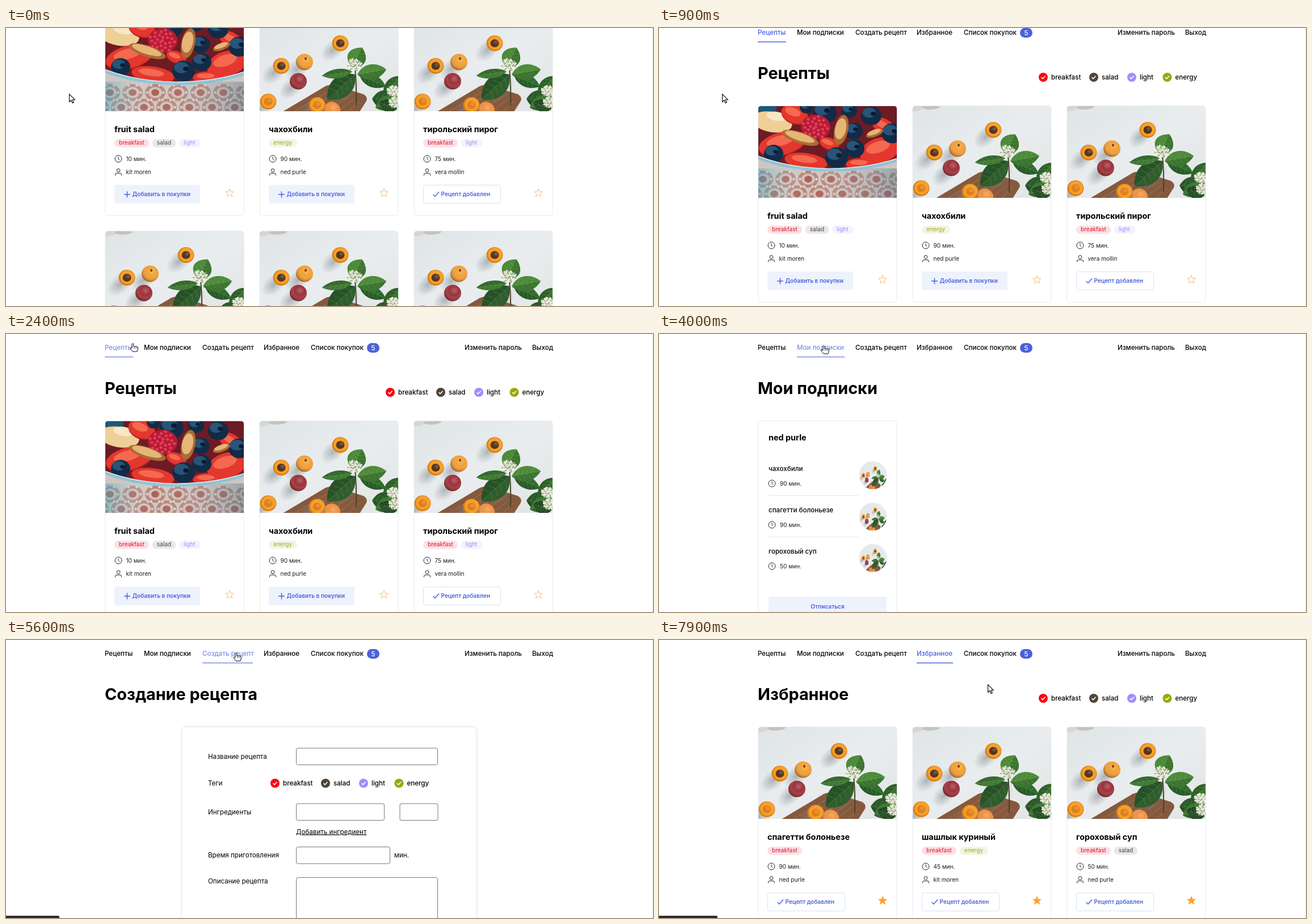
Write an HTML page that moves like this. It is 1140x491 px and loops after 8 s.

```html
<!DOCTYPE html>
<html lang="ru">
<head>
<meta charset="utf-8">
<title>Рецепты</title>
<style>
html, body { margin: 0; width: 100%; height: 100%; overflow: hidden; background: #fff; }
svg { display: block; }
text { font: 500 11.6px Inter, "Open Sans", sans-serif; fill: #000; white-space: pre; }
text.title { font-size: 28.8px; font-weight: 700; }
text.name { font-size: 14.4px; font-weight: 700; }
text.small { font-size: 10.1px; font-weight: 400; fill: #1c1c1c; }
text.button { font-size: 10.1px; font-weight: 600; fill: #4a61dd; }
text.label { font-weight: 400; }
.icon { fill: none; stroke: #222; }
.blue { fill: none; stroke: #4a61dd; stroke-width: 1.5; }
.frame { fill: #fff; stroke: #e8eaee; }
.input { fill: #fff; stroke: #777; }
</style>
</head>
<body>
<svg id="stage" width="1140" height="491" viewBox="0 0 1140 491"></svg>
<script>
const LOOP = 8000;
const stage = document.getElementById('stage');

// ---- drawing helpers ----
const text = (x, y, str, cls = '', extra = '') => `<text x="${x}" y="${y}" class="${cls}" ${extra}>${str}</text>`;
const rect = (x, y, w, h, r, attrs) => `<rect x="${x}" y="${y}" width="${w}" height="${h}" rx="${r}" ${attrs}/>`;
const path = (d, attrs) => `<path d="${d}" ${attrs}/>`;
const blob = (x, y, rx, ry, color, turn = 0) =>
  `<ellipse cx="${x}" cy="${y}" rx="${rx}" ry="${ry}" fill="${color}" transform="rotate(${turn} ${x} ${y})"/>`;
const at = (x, y, body, attrs = '') => `<g transform="translate(${x} ${y})" ${attrs}>${body}</g>`;
const times = (n, fn) => Array.from({ length: n }, (_, i) => fn(i)).join('');

// ---- photos, 244 x 162 ----
const leaf = (x, y, len, bulge, angle, color) =>
  `<g transform="translate(${x} ${y}) rotate(${angle})">` +
  path(`M0 0C${len * .25} ${-bulge} ${len * .7} ${-bulge} ${len} 0C${len * .7} ${bulge} ${len * .25} ${bulge} 0 0`, `fill="${color}"`) +
  path(`M0 0C${len * .25} ${bulge} ${len * .7} ${bulge} ${len} 0Z`, 'fill="#12301a" opacity=".25"') +
  path(`M0 0H${len}` + times(4, i => `M${len * (i + 1) / 6} 0l6 ${-bulge / 2}m-6 ${bulge / 2}l6 ${bulge / 2}`),
    'fill="none" stroke="#a4c878" stroke-opacity=".3" stroke-width=".8"') + '</g>';

const blossom = (x, y, size) => times(50, i => {
  const d = size * Math.sqrt(i / 50), a = i * 2.4;
  return blob(x + d * Math.cos(a), y + d * .75 * Math.sin(a), 1.9, 1.6, i % 3 ? '#eeeee2' : '#a9b491');
});

const castShadow = (x, y) => blob(x - 13, y + 12, 25, 16, 'url(#cast)', -42);
const half = (x, y, pit) => castShadow(x, y) + blob(x, y, 14.5, 14, '#d98316') +
  blob(x + 1, y - 1, 12.5, 12, '#f6a02b') + blob(x, y, 7.5, 7, pit) + blob(x + 2, y - 2, 3.5, 3, '#fff', 0).replace('/>', ' opacity=".15"/>');
const whole = (x, y, color) => castShadow(x, y) + blob(x, y, 15, 14.5, color) + blob(x, y, 15, 14.5, 'url(#sphere)');

const apricots = rect(0, 0, 244, 162, 0, 'fill="url(#table)"') +
  blob(30, 0, 18, 6, '#c5c2b8') + blob(2, 2, 16, 7, '#d5d6d2') +
  path('M40 163L112 120Q120 114 132 116L183 132Q191 137 188 144L176 163Z', 'fill="#85593e"') +
  times(6, i => path(`M${62 + i * 19} 162l${64 - i * 9} ${-38 + i * 4}`, 'stroke="#a97a58" stroke-width="1.5" opacity=".5"')) +
  half(142, 42, '#583620') + half(38, 82, '#583620') + half(15, 145, '#e0801c') + half(101, 151, '#e0801c') +
  whole(79, 75, '#f2a035') + blob(81, 69, 2, 2.5, '#6b4420') +
  whole(68, 109, '#9c3039') + whole(127, 160, '#ee9040') +
  blob(148, 122, 34, 22, 'url(#cast)', -40) +
  leaf(168, 97, 66, 25, 138, '#2f5d2d') + leaf(163, 92, 54, 11, 172, '#407a35') +
  leaf(162, 84, 39, 22, -62, '#4b8a38') + leaf(176, 98, 50, 15, 24, '#2f6b2f') +
  leaf(172, 97, 52, 18, -10, '#4c8b3a') +
  leaf(246, 100, 46, 16, 126, '#37702f') + leaf(198, 140, 46, 22, 4, '#2b5a2a') +
  leaf(204, 156, 46, 17, -24, '#3c7834') + leaf(242, 158, 34, 15, 200, '#244d25') +
  path('M168 86Q171 120 170 152', 'fill="none" stroke="#4b4328" stroke-width="2"') +
  blossom(166, 80, 14) + blossom(236, 126, 12) + blossom(240, 146, 13);

const berry = (x, y, r) => blob(x, y, r, r * .92, '#122b46') + blob(x - r * .2, y - r * .3, r * .65, r * .5, '#285478') +
  blob(x + r * .2, y - r * .2, r * .25, r * .2, '#0b1c30');
const slice = (x, y, rx, ry, turn) => blob(x, y + 2, rx, ry, '#a81f22', turn) + blob(x, y, rx, ry, '#e4372d', turn) +
  blob(x - 3, y - ry * .25, rx * .6, ry * .45, '#f4694f', turn);
const walnut = (x, y, rx, ry, turn) => blob(x, y, rx, ry, '#a86c35', turn) + blob(x - 1, y - 2, rx * .8, ry * .7, '#e6b577', turn);

const RIM = 'M0 91Q55 112 125 113Q195 112 244 95';
const tile = (x, y) => `<g transform="translate(${x} ${y})">` + blob(0, 0, 18, 15, '#b9837b') +
  blob(0, 0, 12, 10, '#d3c1b8') + blob(0, 0, 7, 6, '#ac625a') +
  times(6, i => blob(14.5, 0, 2.2, 2.2, '#d9d2cb', 0).replace('rotate(0 14.5 0)', `rotate(${i * 60})`)) + '</g>';

const fruitBowl = rect(0, 0, 244, 162, 0, 'fill="#6d1b24"') +
  blob(4, 4, 28, 18, '#1d5977') + blob(24, 28, 36, 18, '#efcf98', 10) + blob(32, 18, 18, 8, '#f8e7c4', 10) +
  slice(64, 14, 24, 16, 20) + slice(42, 66, 42, 20, -14) + slice(84, 97, 38, 14, 8) +
  slice(214, 78, 36, 22, -18) + slice(180, 102, 26, 10, 0) + slice(222, 36, 24, 13, 30) + slice(125, 66, 18, 10, 20) +
  berry(117, 12, 21) + berry(160, 8, 14) + berry(199, 17, 18) + berry(236, 48, 19) + berry(168, 44, 16) + berry(85, 2, 12) +
  blob(101, 37, 26, 22, '#b81a36') +
  times(26, i => blob(101 + 4.6 * Math.sqrt(i) * Math.cos(i * 2.4), 37 + 4 * Math.sqrt(i) * Math.sin(i * 2.4), 2.6, 2.4, '#e23f58')) +
  walnut(74, 56, 34, 10, 18) + walnut(146, 42, 12, 27, 12) + walnut(205, 48, 16, 6, -20) +
  berry(170, 75, 17) + berry(27, 84, 17) + berry(138, 91, 20) +
  path(RIM + 'V162H0Z', 'fill="#cfc6bf"') +
  `<g clip-path="url(#bowlClip)">` +
  times(14, i => tile(8 + (i % 7) * 40 - (i > 6 ? 20 : 0), i > 6 ? 155 : 129)) + '</g>' +
  path(RIM, 'fill="none" stroke="#8fc3d8" stroke-width="6"') +
  at(0, -2.5, path(RIM, 'fill="none" stroke="#dcebf0" stroke-width="1.5"')) +
  rect(0, 110, 244, 52, 0, 'fill="url(#shade)"');

const stops = list => list.map(([offset, color, alpha]) => `<stop offset="${offset}" stop-color="${color}" stop-opacity="${alpha}"/>`).join('');
const defs = `<defs>
  <linearGradient id="table" x2="1" y2="1">${stops([[0, '#dfe4e7', 1], [.5, '#e9edef', 1], [1, '#e2e4e3', 1]])}</linearGradient>
  <linearGradient id="shade">${stops([[0, '#3aa5bd', .45], [.35, '#fff', 0], [1, '#3f6f86', .4]])}</linearGradient>
  <radialGradient id="cast">${stops([[0, '#6f787e', .5], [.5, '#7f888e', .28], [1, '#7f888e', 0]])}</radialGradient>
  <radialGradient id="sphere" cx=".6" cy=".35" r=".65">${stops([[0, '#fff', .25], [.45, '#fff', 0], [1, '#401000', .4]])}</radialGradient>
  <clipPath id="bowlClip"><path d="${RIM}V162H0Z"/></clipPath>
  <clipPath id="photoClip"><path d="M0 162V5Q0 0 5 0H239Q244 0 244 5V162Z"/></clipPath>
  <clipPath id="thumbClip"><circle cx="24.5" cy="24.5" r="24.5"/></clipPath>
  <symbol id="apricots" viewBox="0 0 244 162" preserveAspectRatio="none">${apricots}</symbol>
  <symbol id="bowl" viewBox="0 0 244 162" preserveAspectRatio="none">${fruitBowl}</symbol>
</defs>`;

// ---- interface parts ----
const clock = (x, y) => `<circle cx="${x}" cy="${y}" r="6" class="icon"/>` + path(`M${x} ${y - 3.5}V${y}l2 2.2`, 'class="icon"');
const person = (x, y) => `<circle cx="${x}" cy="${y - 3}" r="2.9" class="icon"/>` +
  path(`M${x - 5.5} ${y + 6}v-1.5q0-2.5 2.5-2.5h6q2.5 0 2.5 2.5v1.5`, 'class="icon"');
const star = (x, y, filled) => path('M' + Array.from({ length: 10 }, (_, i) => {
  const r = i % 2 ? 3.3 : 7.6, a = i * Math.PI / 5;
  return `${(x + r * Math.sin(a)).toFixed(1)} ${(y - r * Math.cos(a)).toFixed(1)}`;
}).join('L') + 'Z', `fill="${filled ? '#ffa32b' : 'none'}" stroke="${filled ? '#ffa32b' : '#f9bd6c'}" stroke-linejoin="round"`);

const TAGS = {
  breakfast: { width: 61, ink: '#e00f2b', tint: '#fce0e4', dot: '#fb0312', shift: 0 },
  salad: { width: 41.5, ink: '#4b433c', tint: '#e9e8e8', dot: '#504539', shift: 89 },
  light: { width: 38, ink: '#9c8cf8', tint: '#f3f3fe', dot: '#a08dff', shift: 156 },
  energy: { width: 50, ink: '#a0aa17', tint: '#f3f4e4', dot: '#9ba80c', shift: 218.5 },
};

const legend = (x, y) => Object.entries(TAGS).map(([name, tag]) => at(x + tag.shift, y,
  `<circle r="8" fill="${tag.dot}"/>` + path('M-3.5 0L-1 2.5L3.5 -2.3', 'fill="none" stroke="#fff" stroke-width="1.6"') +
  text(14, 4, name))).join('');

function tagRow(names) {
  let x = 16;
  return names.map(name => {
    const { width, ink, tint } = TAGS[name];
    const pill = rect(x, 211, width, 14.5, 7.2, `fill="${tint}"`) + text(x + 8, 221.3, name, 'small', `style="fill:${ink}"`);
    x += width + 5.8;
    return pill;
  }).join('');
}

const photoCard = (photo, body = '') => rect(0, -.5, 244, 347, 5, 'class="frame"') +
  `<use href="#${photo}" width="244" height="162" clip-path="url(#photoClip)"/>` + body;

function recipeCard({ name, tags, minutes, author, photo = 'apricots', added, starred }) {
  const button = added
    ? rect(16.5, 292.5, 136, 32, 3, 'fill="#fff" stroke="#d8e1f6"') + path('M33.5 309l3.5 3.5l7-8', 'class="blue"')
    : rect(16, 292, 151, 33, 3, 'fill="#eef2fd"') + path('M33 309h11M38.5 303.5v11', 'class="blue"');
  return photoCard(photo, text(16, 199.4, name, 'name') + tagRow(tags) +
    clock(23, 246) + text(36.5, 249.5, `${minutes} мин.`, 'small') +
    person(23, 269.5) + text(36.5, 273, author, 'small') +
    button + text(47.5, 312, added ? 'Рецепт добавлен' : 'Добавить в покупки', 'button') +
    star(219, 306.5, starred));
}

const row = (cards, y = 154) => cards.map((card, i) => at(175 + 272 * i, y, card)).join('');
const heading = str => text(174, 106, str, 'title');

// ---- pages ----
const KIT = 'kit moren', NED = 'ned purle', VERA = 'vera mollin';

const recipes = heading('Рецепты') + legend(677, 103) + row([
  { name: 'fruit salad', tags: ['breakfast', 'salad', 'light'], minutes: 10, author: KIT, photo: 'bowl' },
  { name: 'чахохбили', tags: ['energy'], minutes: 90, author: NED },
  { name: 'тирольский пирог', tags: ['breakfast', 'light'], minutes: 75, author: VERA, added: true },
].map(recipeCard)) + row(Array(3).fill(photoCard('apricots')), 528);

const subscriptions = heading('Мои подписки') + rect(175, 153.5, 244, 361, 5, 'class="frame"') + text(193, 188, NED, 'name') +
  [['чахохбили', 90], ['спагетти болоньезе', 90], ['гороховый суп', 50]].map(([name, minutes], i) => at(193, 225 + 73 * i,
    text(0, 17, name) + clock(6, 39) + text(20, 42.5, `${minutes} мин.`, 'small') +
    at(159.5, 0, '<use href="#apricots" width="49" height="49"/>', 'clip-path="url(#thumbClip)"') +
    (i < 2 ? path('M0 60.5H159', 'stroke="#e6e8ec"') : ''))).join('') +
  rect(193, 464, 208, 32, 3, 'fill="#eef2fd"') + text(297, 484.5, 'Отписаться', 'button', 'text-anchor="middle"');

const labels = [['Название рецепта', 210], ['Теги', 257], ['Ингредиенты', 307.5], ['Время приготовления', 384], ['Описание рецепта', 430]];
const inputs = [[511.5, 191, 249], [511.5, 289, 155], [694, 289, 67], [511.5, 365.5, 165]];
const createForm = heading('Создание рецепта') +
  rect(309, 153, 521, 400, 9, 'fill="none" stroke="#f4f5f7" stroke-width="3"') + rect(309.5, 153.5, 520, 400, 8, 'class="frame"') +
  labels.map(([str, y]) => text(356, y, str, 'label')).join('') +
  inputs.map(([x, y, w]) => rect(x, y, w, 29.5, 3, 'class="input"')).join('') +
  rect(511.5, 419.5, 249, 120, 3, 'class="input"') + legend(474, 253) +
  text(511, 342.5, 'Добавить ингредиент', 'label', 'text-decoration="underline"') + text(684, 384, 'мин.', 'label');

const favouritesHead = heading('Избранное') + legend(677, 103);
const favourites = favouritesHead + row([
  { name: 'спагетти болоньезе', tags: ['breakfast'], minutes: 90, author: NED },
  { name: 'шашлык куриный', tags: ['breakfast', 'energy'], minutes: 45, author: KIT },
  { name: 'гороховый суп', tags: ['breakfast', 'salad'], minutes: 50, author: NED },
].map(card => recipeCard({ ...card, added: true, starred: true })));

const LINKS = [['Рецепты', 174, 224], ['Мои подписки', 243, 327], ['Создать рецепт', 346, 435], ['Избранное', 454, 518],
  ['Список покупок', 537, 629], ['Изменить пароль', 808, 909], ['Выход', 927, 964]];
const nav = LINKS.map(([str, x, end]) => `<g class="link">${text(x, 28.3, str)}${path(`M${x} 40.5H${end}`, 'stroke="#4a61dd" stroke-width="1.3"')}</g>`).join('') +
  rect(636, 16, 22, 17, 8.5, 'fill="#4a61dd"') + text(647, 28.5, '5', '', 'text-anchor="middle" style="fill:#fff"');

// start time, markup, active link
const PAGES = [[0, recipes, 0], [4000, subscriptions, 1], [5600, createForm, 2], [7000, favouritesHead, 3], [7200, favourites, 3]];

stage.innerHTML = defs + `<g id="content">${PAGES.map(p => `<g class="page">${p[1]}</g>`).join('')}${nav}</g>` +
  path('M1139.5 0V491', 'id="edge" stroke="#e9e9e9"') +
  path('', 'id="status" fill="#2d2d2f"') +
  path('M.6 .8V14.5L3.8 11.5L6 16.5L8.3 15.5L6.1 10.7H10.3Z', 'id="arrow" fill="#fff" stroke="#000" stroke-width="1.1"') +
  `<g id="hand">${path('M4 9V2.2a1.4 1.4 0 0 1 2.8 0V6H12q2.3 0 2.3 2.2V11L12.8 15H5.2L1 9.8Q.8 7.5 2.8 8Z', 'fill="#fff" stroke="#000" stroke-linejoin="round"')}${path('M7.5 7.5v2M9.7 7.5v2M12 7.5v2', 'stroke="#000" stroke-width=".8"')}</g>`;

// ---- motion ----
const SCROLL = [[0, 169], [100, 141], [200, 133], [300, 133], [400, 90], [500, 80], [700, 80], [800, 44], [900, 16],
  [1000, 5], [1100, 1], [1200, 1], [1300, 0], [4100, 0], [4200, 107], [4500, 107], [4600, 54], [4700, 0]];
const POINTER = [[0, 111, 116], [2000, 111, 116], [2400, 218, 16], [3900, 218, 16], [4000, 285, 20], [4100, 285, 20],
  [4200, 393, 178], [5000, 393, 178], [5400, 400, 22], [6000, 400, 22], [6500, 486, 15], [6600, 486, 15],
  [6700, 487, 20], [7300, 487, 21], [7400, 486, 23], [7500, 486, 23], [7700, 579, 78]];

function track(keys, t) {
  const next = keys.findIndex(k => k[0] > t);
  if (next < 0) return keys.at(-1).slice(1);
  const a = keys[next - 1], b = keys[next], p = (t - a[0]) / (b[0] - a[0]);
  return a.slice(1).map((v, i) => v + (b[i + 1] - v) * p);
}

const $ = id => document.getElementById(id);
const pages = stage.querySelectorAll('.page'), links = stage.querySelectorAll('.link');
const show = (el, on) => el.setAttribute('display', on ? 'inline' : 'none');

function render(now) {
  const t = Math.floor(now % LOOP / 100) * 100;
  const current = PAGES.findLastIndex(p => p[0] <= t);
  const [scroll] = track(SCROLL, t), [x, y] = track(POINTER, t);
  const loading = t >= 7000 && t < 7200;

  pages.forEach((page, i) => show(page, i === current));
  $('content').setAttribute('transform', `translate(${loading ? 7 : 0} ${-Math.round(scroll)})`);
  show($('edge'), !loading);

  let hovering = false;
  links.forEach((link, i) => {
    const active = i === PAGES[current][2];
    const hover = y < 30 && x + 6 >= LINKS[i][1] && x + 5 <= LINKS[i][2];
    hovering ||= hover;
    link.firstChild.style.fill = active ? '#4a61dd' : '#000';
    show(link.lastChild, active);
    link.setAttribute('opacity', hover ? .72 : 1);
  });

  show($('hand'), hovering);
  show($('arrow'), !hovering);
  $(hovering ? 'hand' : 'arrow').setAttribute('transform', `translate(${Math.round(x)} ${Math.round(y)})`);
  show($('status'), t >= 5400 && !loading);
  $('status').setAttribute('d', `M0 487H${t < 6400 ? 92 : 101}q2 0 2 2V491H0Z`);
}

const begin = performance.now();
(function tick() {
  render(performance.now() - begin);
  requestAnimationFrame(tick);
})();
</script>
</body>
</html>
```
